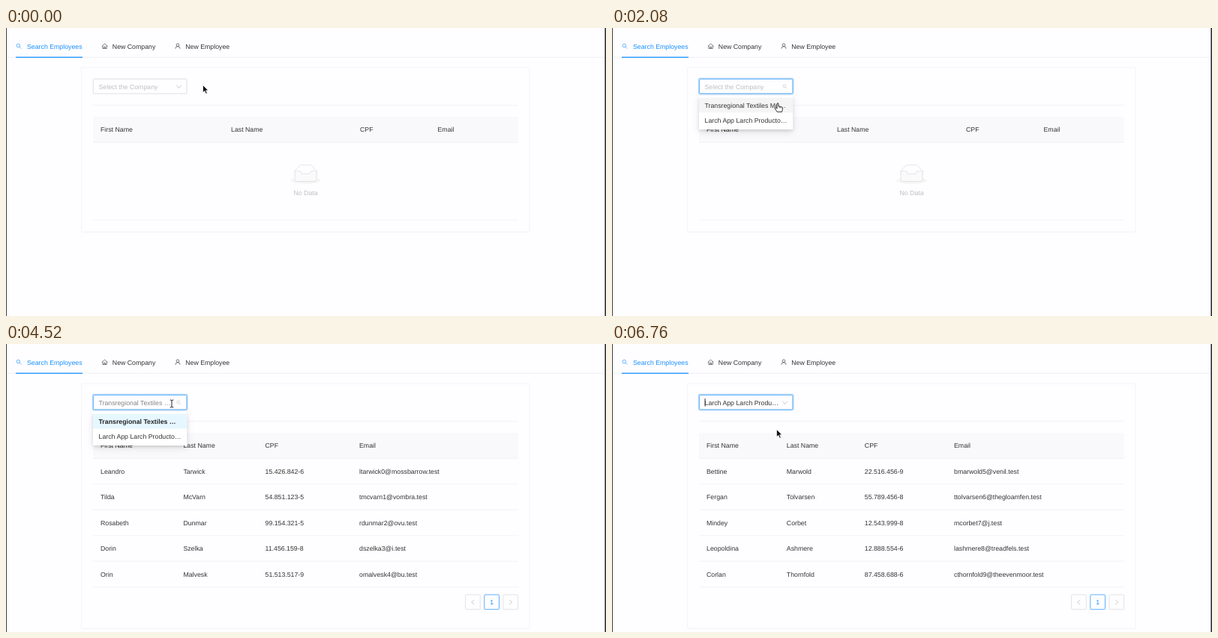
Write an HTML page that moves like this. It is 800 by 386 pixels and loops after 7.32 s.

```html
<!DOCTYPE html>
<html lang="en">
<head>
<meta charset="utf-8">
<title>Employee search</title>
<style>
  html, body { margin: 0; width: 100%; height: 100%; overflow: hidden; background: #fefdff; }
  svg { display: block; width: 800px; height: 386px; }
  text {
    font: 8.78px "Liberation Sans", Arial, sans-serif;
    fill: #333; text-rendering: geometricPrecision; white-space: pre;
  }
  .blue { fill: #1890ff; }
  .pale { fill: #bfbfbf; }
  .bold { font-weight: 700; fill: #262626; }
  .rule { stroke: #f0f0f2; stroke-width: .8; }
  .icon { fill: none; stroke: #333; stroke-width: 76; }
  .chev { fill: none; stroke: #bfbfbf; stroke-width: .8; }
  #panel { filter: drop-shadow(0 2px 2px rgba(0,0,0,.1)) drop-shadow(0 3px 5px rgba(0,0,0,.1)); }
</style>
</head>
<body>
<svg id="stage" viewBox="0 0 800 386">
  <defs>
    <g id="lens"><circle cx="412" cy="412" r="262"/><path d="M600 600L885 885"/></g>
  </defs>
  <rect width="800" height="386" fill="#fefdff"/>
  <path class="rule" d="M1 39.4H798"/>
  <rect x="13" y="38.6" width="89" height="1.3" fill="#1890ff"/>
  <use href="#lens" class="icon" style="stroke:#1890ff" transform="translate(12.8 20) scale(.00857)"/>
  <g class="icon" transform="translate(127.2 20) scale(.00857)">
    <path d="M70 520L512 130L954 520M200 440V870H824V440M415 870V610H609V870"/>
  </g>
  <g class="icon" transform="translate(224.6 20) scale(.00857)">
    <circle cx="512" cy="320" r="215"/><path d="M150 910A362 362 0 0 1 874 910"/>
  </g>
  <g id="tabs"></g>

  <rect id="card" x="100.6" y="53" width="597.4" fill="none" stroke="#f0f0f2" stroke-width=".8" rx="1.2"/>
  <path class="rule" d="M116 103.5H683"/>
  <rect x="116" y="119" width="567" height="34.4" fill="#f9f9fb"/>
  <path class="rule" d="M116 153.4H683"/>

  <g id="empty">
    <g transform="translate(379.5 183) scale(.627)">
      <ellipse cx="32" cy="34" rx="32" ry="7" fill="#f5f5f6"/>
      <g stroke="#d9d9d9" transform="translate(0 1)">
        <path fill="#fefdff" d="M55 12.8L44.9 1.3Q44 0 42.9 0H21.1Q20 0 19.1 1.3L9 12.8V22H55Z"/>
        <path fill="#fafafa" d="M41.6 15.9Q41.6 13 43.8 13H55V31Q55 35 52 35H12Q9 35 9 31V13H20.2Q22.4 13 22.4 16T24.6 18.9H39.4Q41.6 18.9 41.6 15.9Z"/>
      </g>
    </g>
    <text class="pale" x="399.5" y="223.7" text-anchor="middle">No Data</text>
    <path class="rule" d="M116 257.6H683"/>
  </g>
  <g id="tables"></g>
  <g id="pager">
    <g fill="#fefdff" stroke="#d9d9d9" stroke-width=".7">
      <rect x="612.6" y="336" width="19.7" height="19.7" rx="1.2"/>
      <rect x="637.8" y="336" width="19.7" height="19.7" rx="1.2" stroke="#1890ff"/>
      <rect x="662.9" y="336" width="19.7" height="19.7" rx="1.2"/>
    </g>
    <path class="chev" d="M624.2 343L620.6 346L624.2 349M671.2 343L674.8 346L671.2 349"/>
    <text class="blue" x="647.6" y="349" text-anchor="middle">1</text>
  </g>

  <rect id="ring" x="115.4" y="67.4" width="126.6" height="21.4" rx="1.6" fill="none" stroke="#1890ff" stroke-opacity=".2" stroke-width="1.6"/>
  <rect x="116.3" y="68.3" width="124.7" height="19.7" rx="1.2" fill="#fefdff" stroke="#d9d9d9" stroke-width=".8"/>
  <rect id="edge" x="116.3" y="68.3" width="124.7" height="19.7" rx="1.2" fill="none" stroke="#40a9ff" stroke-width=".9"/>
  <text id="value" x="123.5" y="81.6"></text>
  <path id="down" class="chev" d="M227.4 76.6L230.5 80.7L233.6 76.6"/>
  <use id="find" href="#lens" class="icon" style="stroke:#bfbfbf" transform="translate(226.7 74.8) scale(.00735)"/>
  <rect id="caret" x="123.6" y="73" width=".9" height="10.6" fill="#222"/>

  <g id="panel">
    <rect x="116" y="91" width="125.2" height="45" rx="1.2" fill="#fff"/>
    <rect id="row0" x="116" y="93.5" width="125.2" height="20"/>
    <rect id="row1" x="116" y="113.5" width="125.2" height="20" fill="#f5f5f5"/>
    <text id="opt0" x="123.5" y="106.6"></text>
    <text x="123.5" y="126.6">Larch App Larch Producto…</text>
  </g>

  <g id="arrow">
    <path d="M0 0V10L2.4 7.9L4.1 11.8L5.8 11L4.1 7.3H7.2Z" fill="#111" stroke="#fff" stroke-width=".7"/>
  </g>
  <g id="beam" fill="none">
    <path d="M-2.3 -5Q-.5 -5 0 -4.2Q.5 -5 2.3 -5M0 -4.2V4.2M-2.3 5Q-.5 5 0 4.2Q.5 5 2.3 5" stroke="#fff" stroke-width="2"/>
    <path d="M-2.3 -5Q-.5 -5 0 -4.2Q.5 -5 2.3 -5M0 -4.2V4.2M-2.3 5Q-.5 5 0 4.2Q.5 5 2.3 5" stroke="#222" stroke-width="1"/>
  </g>
  <g id="hand">
    <path d="M-1 .2Q0 -1 1 .2V4L5.6 5Q6.6 5.4 6.4 7L5.6 11.4H-.8L-3.8 7Q-4 5.6 -2.6 5.8L-1 7.2Z" fill="#fff" stroke="#222" stroke-width=".9" stroke-linejoin="round"/>
    <path d="M2.3 4.6V6.4M4.1 5V6.6" stroke="#222" stroke-width=".6"/>
  </g>

  <rect width="1" height="386" fill="#3d3d46"/>
  <rect x="798.4" width="1.6" height="386" fill="#2b2e39"/>
</svg>
<script>
const LOOP = 7320;
const OPEN = [1270, 4350], PICK = [2390, 5670], LOAD = [2550, 5830];
const CARET = [[1280, 1800], [2480, 3160], [3780, 4320], [4560, 5100], [5640, 6180], [6720, LOOP]];
// time, x, y of the pointer's hot spot
const PATH = [
  [120, 262.5, 76.5], [340, 296, 100], [500, 317, 110], [680, 284, 68], [840, 246, 77],
  [1080, 227, 75], [1400, 227, 75], [1620, 205, 98], [1840, 180, 115], [2000, 190, 114],
  [2080, 221, 101], [2900, 220.5, 102], [3160, 220.5, 102], [3500, 250, 116], [3840, 221, 80],
  [4680, 221, 80], [5040, 222, 103], [5240, 202, 121], [5440, 217.5, 121], [5900, 217.5, 121],
  [6300, 219.5, 114.5]
];
const FIRST = "Transregional Textiles ";
const HEADS = ["First Name", "Last Name", "CPF", "Email"];
const TABLES = [
  { cols: [126, 300, 472, 575.5], rows: [] },
  { cols: [126, 236.4, 345.5, 471], rows: [
    ["Leandro", "Tarwick", "15.426.842-6", "ltarwick0@mossbarrow.test"],
    ["Tilda", "McVarn", "54.851.123-5", "tmcvarn1@vombra.test"],
    ["Rosabeth", "Dunmar", "99.154.321-5", "rdunmar2@ovu.test"],
    ["Dorin", "Szelka", "11.456.159-8", "dszelka3@i.test"],
    ["Orin", "Malvesk", "51.513.517-9", "omalvesk4@bu.test"]] },
  { cols: [126, 232.8, 336.8, 456], rows: [
    ["Bettine", "Marwold", "22.516.456-9", "bmarwold5@venil.test"],
    ["Fergan", "Tolvarsen", "55.789.456-8", "ttolvarsen6@thegloamfen.test"],
    ["Mindey", "Corbet", "12.543.999-8", "mcorbet7@j.test"],
    ["Leopoldina", "Ashmere", "12.888.554-6", "lashmere8@treadfels.test"],
    ["Corlan", "Thornfold", "87.458.688-6", "cthornfold9@theevenmoor.test"]] }
];

const $ = id => document.getElementById(id);
const clamp = v => Math.max(0, Math.min(1, v));
const span = (t, from, len) => clamp((t - from) / len);
const show = (id, on) => { $(id).style.opacity = +on; };
const label = (x, y, s, cls = "") => `<text class="${cls}" x="${x}" y="${y}">${s}</text>`;

$("tabs").innerHTML = label(28, 27.7, "Search Employees", "blue") +
  label(141.8, 27.7, "New Company") + label(239.2, 27.7, "New Employee");

$("tables").innerHTML = TABLES.map(({ cols, rows }) => {
  const line = (cells, y) => cells.map((s, i) => label(cols[i], y, s)).join("");
  return "<g>" + line(HEADS, 139.2) + rows.map((r, i) => {
    const y = 153.4 + 34.45 * i;
    return line(r, y + 20.4) + `<path class="rule" d="M116 ${y + 34.45}H683"/>`;
  }).join("") + "</g>";
}).join("");

function pointer(t) {
  let i = PATH.findIndex(p => p[0] > t);
  if (i === 0) return PATH[0].slice(1);
  if (i < 0) return PATH[PATH.length - 1].slice(1);
  const [t0, x0, y0] = PATH[i - 1], [t1, x1, y1] = PATH[i];
  const u = (t - t0) / (t1 - t0), k = u * u * (3 - 2 * u);
  return [x0 + (x1 - x0) * k, y0 + (y1 - y0) * k];
}

function draw(t) {
  const round = t >= OPEN[1] ? 1 : 0;
  const opened = span(t, OPEN[round], 150), closed = span(t, PICK[round], 200);
  const isOpen = t >= OPEN[round] && t < PICK[round];
  const data = LOAD.filter(v => t >= v).length;
  const picks = PICK.filter(v => t >= v).length;
  const [x, y] = pointer(t);

  [...$("tables").children].forEach((g, i) => { g.style.display = i === data ? "" : "none"; });
  show("empty", data === 0);
  show("pager", data > 0);
  $("card").setAttribute("height", data ? 328.3 : 220.4);

  show("edge", span(t, 860, 220));
  show("ring", span(t, OPEN[0], 150));
  show("find", isOpen ? opened : 0);
  show("down", !isOpen);
  show("caret", CARET.some(([a, b]) => t >= a && t < b));

  $("value").textContent = ["Select the Company", FIRST + "…", "Larch App Larch Produ…"][picks];
  const dim = picks === 0 ? 1 : isOpen ? span(t, OPEN[round], 300) : 0;
  const grey = Math.round(51 + 140 * dim);
  $("value").style.fill = `rgb(${grey},${grey},${grey})`;

  const shown = (1 - (1 - opened) ** 5) * (1 - closed ** 2);
  const panel = $("panel");
  panel.style.display = shown > 0 ? "" : "none";
  panel.style.opacity = shown;
  const s = .8 + .2 * shown;
  panel.setAttribute("transform", `translate(0 ${91 * (1 - s)}) scale(1 ${s})`);
  const second = y > 113.5;
  $("row0").setAttribute("fill", round ? "#e6f7ff" : second ? "#fff" : "#f5f5f5");
  show("row1", second);
  $("opt0").textContent = FIRST + (round ? "…" : "Mo…");
  $("opt0").setAttribute("class", round ? "bold" : "");

  const inBox = x > 116 && x < 241 && y > 68 && y < 89;
  const kind = inBox ? "beam" : isOpen && y > 92 && t < 5640 ? "hand" : "arrow";
  for (const id of ["arrow", "beam", "hand"]) {
    show(id, id === kind);
    $(id).setAttribute("transform", `translate(${x} ${y})`);
  }
}

const start = performance.now();
function tick() {
  draw((performance.now() - start) % LOOP);
  requestAnimationFrame(tick);
}
tick();
</script>
</body>
</html>
```
